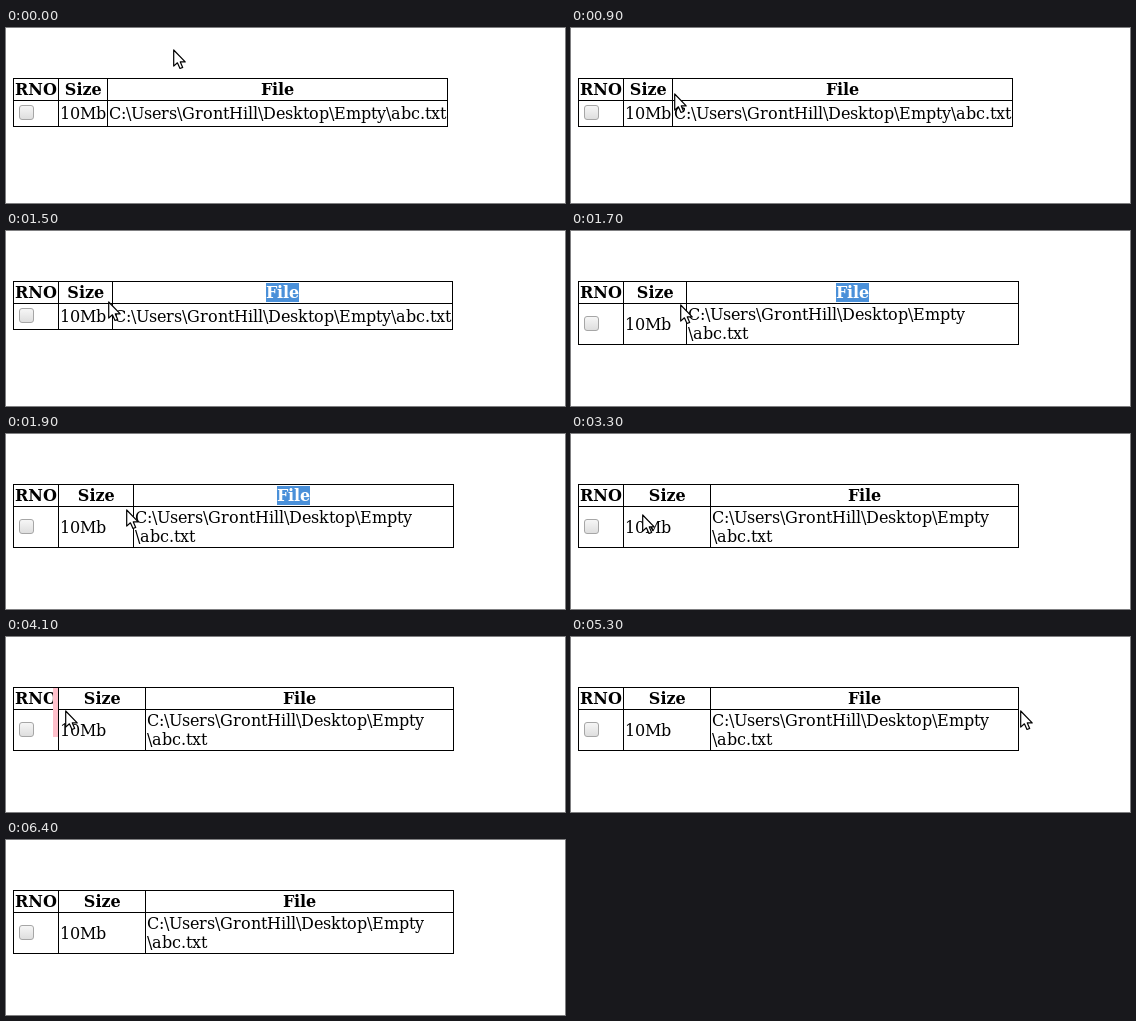
An HTML page that plays this animation: 559x175 px, repeating every 7.5 s.

```html
<!DOCTYPE html>
<html lang="en">
<head>
<meta charset="utf-8">
<title>Resizable table columns</title>
<style>
html, body { margin: 0; width: 100%; height: 100%; overflow: hidden; background: #fff; }
body { position: relative; font: 16px/19px "DejaVu Serif", serif; color: #000; }
.cell, .bar, .cursor, .box { position: absolute; }
.cell { box-sizing: border-box; border: 1px solid #000; padding: 1px; white-space: pre; }
.head { top: 50px; height: 23px; font-weight: bold; text-align: center; }
.body { top: 72px; }
.text { display: inline-block; height: 19px; vertical-align: top; }
.text i { display: inline-block; font-style: normal; }
.selected { background: #4a90d9; color: #fff; }
.box {
  left: 13px; width: 15px; height: 15px; box-sizing: border-box;
  border: 1px solid #a6a6a6; border-radius: 3px;
  background: linear-gradient(#f6f6f6, #dedede);
}
.bar { top: 51px; width: 5px; height: 49px; background: #ffc0cb; }
.cursor { left: 0; top: 0; overflow: visible; }
.cursor path { fill: #fff; stroke: #000; stroke-width: 1.2; stroke-linejoin: round; }
</style>
</head>
<body>
<div class="cell head"><span class="text">RNO</span></div>
<div class="cell head"><span class="text">Size</span></div>
<div class="cell head"><span class="text" id="file">File</span></div>
<div class="cell body"></div>
<div class="cell body"><span class="text">10Mb</span></div>
<div class="cell body" id="path"><span class="text">C:\Users\GrontHill\Desktop\Empty</span><span class="text" id="name">\abc.txt</span></div>
<div class="box"></div>
<div class="bar"></div>
<svg class="cursor" id="arrow" width="13" height="20">
  <path d="M.7 1V17.1L4.4 13.8L7 19.5L9.7 18.4L7.3 12.9H12.2Z"/>
</svg>
<svg class="cursor" id="resize" width="22" height="16">
  <path d="M.8 8L6.5 2.5V6.3H9.3V.7H12.7V6.3H15.5V2.5L21.2 8L15.5 13.5V9.7H12.7V15.3H9.3V9.7H6.5V13.5Z"/>
</svg>
<script>
const LOOP = 7500, STEP = 100, HIDE = 6400;

// Each move: first step, last step, target values, optional cursor kind.
const pointer = [
  [300, 900, [103, 65], 'arrow'],
  [1000, 1000, [101, 69], 'resize'],
  [1100, 1100, [98, 69], 'resize'],
  [1500, 1700, [109, 73], 'arrow'],
  [1800, 2100, [131, 77], 'arrow'],
  [2600, 2600, [131, 80], 'arrow'],
  [2800, 3500, [51, 80], 'arrow'],
  [3700, 3700, [51, 76], 'resize'],
  [4100, 4100, [59, 73], 'arrow'],
  [4200, 4300, [211, 70], 'arrow'],
  [4600, 4600, [208, 70], 'arrow'],
  [4700, 4700, [423, 64], 'arrow'],
  [5000, 5300, [449, 73], 'arrow'],
  [5500, 5500, [446, 75], 'resize'],
  [5900, 6100, [252, 30], 'arrow'],
  [6300, 6300, [229, 29], 'arrow']
];
const divider = [[1500, 1700, [115]], [1800, 2100, [139]]];
// Hovered column handles: from, until, left.
const hovers = [[1000, 1500, 96], [3600, 4200, 47], [5500, 5900, 442]];

const all = s => [...document.querySelectorAll(s)];
const byId = id => document.getElementById(id);
const heads = all('.head'), cells = all('.body');
const [box] = all('.box'), [bar] = all('.bar');
const cursors = { arrow: byId('arrow'), resize: byId('resize') };
const file = byId('file'), path = byId('path'), name = byId('name');

// Snap glyph advances to whole pixels, as hinted text does.
const pen = document.createElement('canvas').getContext('2d');
function snap(el) {
  const { fontWeight, fontSize, fontFamily } = getComputedStyle(el);
  pen.font = `${fontWeight} ${fontSize} ${fontFamily}`;
  el.replaceChildren(...[...el.textContent].map(char => {
    const glyph = document.createElement('i');
    glyph.textContent = char;
    glyph.style.width = Math.round(pen.measureText(char).width) + 'px';
    return glyph;
  }));
}

function follow(track, start, t) {
  let at = start, kind = 'arrow';
  for (const [from, to, target, shape] of track) {
    if (t < from) break;
    const p = Math.min(1, (t - from + STEP) / (to - from + STEP));
    at = at.map((v, i) => Math.round(v + (target[i] - v) * p));
    kind = shape;
  }
  return { at, kind };
}

function layout(split) {
  const right = Math.min(447, split + 340);
  const wrapped = split > 107;
  const edges = [7, 52, split, right];
  [heads, cells].forEach(row => row.forEach((cell, i) => {
    cell.style.left = edges[i] + 'px';
    cell.style.width = edges[i + 1] - edges[i] + 1 + 'px';
  }));
  cells.forEach(cell => {
    cell.style.height = (wrapped ? 42 : 27) + 'px';
    cell.style.paddingTop = (wrapped ? 11 : 3) + 'px';
  });
  if (wrapped) path.style.paddingTop = '1px';
  name.style.display = wrapped ? 'block' : '';
  box.style.top = (wrapped ? 85 : 77) + 'px';
}

function draw(t) {
  layout(follow(divider, [101], t).at[0]);
  file.classList.toggle('selected', t >= 1500 && t < 2900);

  const hover = hovers.find(([from, until]) => t >= from && t < until);
  bar.style.display = hover ? 'block' : 'none';
  if (hover) bar.style.left = hover[2] + 'px';

  const { at: [x, y], kind } = follow(pointer, [167, 21], t);
  for (const shape in cursors) {
    cursors[shape].style.display = shape === kind && t < HIDE ? 'block' : 'none';
  }
  const [dx, dy] = kind === 'resize' ? [11, 8] : [0, 0];
  cursors[kind].style.transform = `translate(${x - dx}px, ${y - dy}px)`;
}

let last = -1;
function tick() {
  const t = Math.floor(performance.now() % LOOP / STEP) * STEP;
  if (t !== last) draw(last = t);
  requestAnimationFrame(tick);
}
all('.text').forEach(snap);
tick();
</script>
</body>
</html>
```
